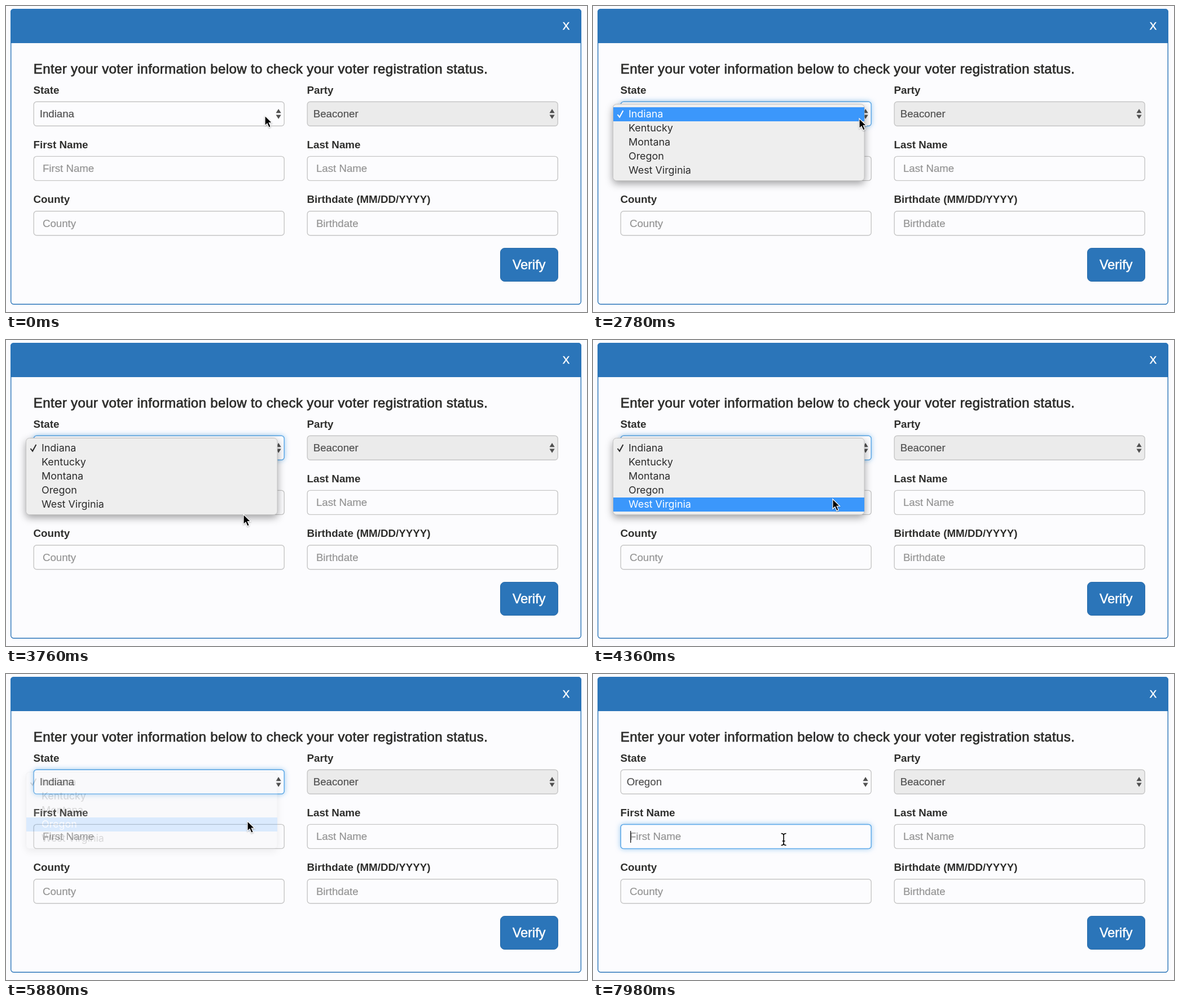
An HTML page that plays this animation: 1030x544 px, repeating every 8000 ms.

```html
<!DOCTYPE html>
<html lang="en">
<head>
<meta charset="utf-8">
<title>Voter registration form</title>
<style>
  html, body { margin: 0; width: 100%; height: 100%; overflow: hidden; background: #fcfcfe; }
  svg { display: block; width: 1030px; height: 544px; font: 18.7px "Liberation Sans", Arial, sans-serif; }
  .heading { font-size: 24px; letter-spacing: .37px; fill: #2e2e2c; stroke: #2e2e2c; stroke-width: .75px; }
  .label { font-size: 18.8px; font-weight: bold; fill: #2e2e2c; }
  .value { fill: #505050; stroke: #505050; stroke-width: .2px; }
  .hint { fill: #949494; stroke: #949494; stroke-width: .2px; }
  .onBlue { fill: #fff; stroke: #fff; stroke-width: .5px; }
  .box { fill: #fcfcfe; stroke: #c6c6c6; stroke-width: 1.4px; }
  .disabled { fill: #ebebeb; }
  .focus { fill: #fcfcfe; stroke: #5fabea; stroke-width: 1.5px; filter: drop-shadow(0 0 5px rgba(102, 175, 233, .65)); }
  .blue { fill: #2b75b9; }
  .arrows { fill: #505050; }
  .panel { fill: #eee; stroke: #c2c2c2; stroke-width: 1px; filter: drop-shadow(0 5px 7px rgba(0, 0, 0, .36)); }
  .item { font: 17.9px Inter, "Liberation Sans", sans-serif; fill: #2b2b2b; }
  .pointer { fill: #000; stroke: #fff; stroke-width: 1.2px; filter: drop-shadow(0 1px 1px rgba(0, 0, 0, .3)); }
</style>
</head>
<body>
<svg viewBox="0 0 1030 544">
  <rect x="8.7" y="5.7" width="1010.6" height="524.6" rx="5" fill="#fcfcfe" stroke="#2b75b9" stroke-width="1.4"/>
  <path class="blue" d="M8 66V11q0-6 6-6H1014q6 0 6 6V66z"/>
  <text class="onBlue" x="986.7" y="42">X</text>
  <text class="heading" x="48.8" y="119.5">Enter your voter information below to check your voter registration status.</text>
  <g id="form"></g>
  <rect class="blue" x="876.5" y="430.5" width="102" height="59" rx="7.5" stroke="#2a6ba8"/>
  <text class="onBlue" x="898" y="468" font-size="23.4">Verify</text>
  <path id="caret" d="M66.7 279V300" stroke="#222" stroke-width="1.4"/>
  <g id="menu">
    <rect class="panel" x="35.5" y="174.5" width="445.5" height="136" rx="6"/>
    <rect id="highlight" x="36" width="445" height="25" fill="#3b97fb"/>
    <path id="check" d="M43.5 193l3.6 4.6L53.4 186" fill="none" stroke-width="2"/>
  </g>
  <circle id="ring" r="29.3" fill="#fcfcfe" fill-opacity=".5" stroke="#111" stroke-width="2"/>
  <path id="arrow" class="pointer" d="M0 0V17.6L4 13.9L7 20.9L10.3 19.6L7.3 12.7H12.7z"/>
  <g id="beam" fill="none">
    <path d="M-4.5 -10.5Q0 -10.5 0 -7V7Q0 10.5 -4.5 10.5M4.5 -10.5Q0 -10.5 0 -7V7Q0 10.5 4.5 10.5M-2.5 3H2.5" stroke="#fff" stroke-width="3.4"/>
    <path d="M-4.5 -10.5Q0 -10.5 0 -7V7Q0 10.5 -4.5 10.5M4.5 -10.5Q0 -10.5 0 -7V7Q0 10.5 4.5 10.5M-2.5 3H2.5" stroke="#000" stroke-width="1.6"/>
  </g>
</svg>
<script>
const LOOP = 8000;
const OPEN = 1520, PICK = 5120, REHIGHLIGHT = 5260, FADE = 5500, CLOSED = 5960, FOCUS_NAME = 7300;
const STATES = ["Indiana", "Kentucky", "Montana", "Oregon", "West Virginia"];
const POINTER = [ // time, x, y
  [0, 459, 195], [200, 459, 195], [1000, 472, 191], [1700, 472, 191], [2500, 472, 200],
  [2850, 472, 200], [3700, 421, 310], [3960, 421, 310], [4700, 428, 261.5],
  [6450, 428, 261.5], [7150, 338, 294], [LOOP, 338, 294]
];
const CLICKS = [[1360, 1600], [7260, 7460]];

const byId = id => document.getElementById(id);

function add(parent, tag, attrs, text = "") {
  const node = document.createElementNS("http://www.w3.org/2000/svg", tag);
  for (const key in attrs) node.setAttribute(key, attrs[key]);
  node.textContent = text;
  parent.append(node);
  return node;
}

function addField(x, y, label, text, kind = "hint", boxClass = "box") {
  const form = byId("form"), isSelect = kind === "value";
  const frame = { x: x + .7, y: y + .7, width: 444, height: 43, rx: 5 };
  add(form, "text", { class: "label", x, y: y - 13.7 }, label);
  add(form, "rect", { ...frame, class: boxClass });
  const focus = add(form, "rect", { ...frame, class: "focus", opacity: 0 });
  if (isSelect) {
    add(form, "path", { class: "arrows", d: `M${x + 430} ${y + 20.8}h9.2l-4.6-7.2zm0 3.3h9.2l-4.6 7.2z` });
  }
  const value = add(form, "text", { class: kind, x: x + (isSelect ? 11.2 : 16.4), y: y + 28.7 }, text);
  return { focus, value };
}

const state = addField(48.5, 169.5, "State", "Indiana", "value");
addField(533.5, 169.5, "Party", "Beaconer", "value", "box disabled");
const firstName = addField(48.5, 266.7, "First Name", "First Name");
addField(533.5, 266.7, "Last Name", "Last Name");
addField(48.5, 364, "County", "County");
addField(533.5, 364, "Birthdate (MM/DD/YYYY)", "Birthdate");

const items = STATES.map((name, i) =>
  add(byId("menu"), "text", { class: "item", x: 63, y: 198.3 + 25 * i }, name));

const clamp = v => Math.min(1, Math.max(0, v));
const ramp = (t, start, end) => clamp((t - start) / (end - start));
const show = (id, visible) => byId(id).setAttribute("visibility", visible ? "visible" : "hidden");
const moveTo = (id, x, y) => byId(id).setAttribute("transform", `translate(${x} ${y})`);

function pointerAt(t) {
  const i = POINTER.findIndex(point => point[0] > t);
  const [t0, x0, y0] = POINTER[i - 1], [t1, x1, y1] = POINTER[i];
  const p = ramp(t, t0, t1), eased = p * p * (3 - 2 * p);
  return [x0 + (x1 - x0) * eased, y0 + (y1 - y0) * eased];
}

function drawMenu(t, y) {
  const opacity = t < OPEN ? 0 : 1 - ramp(t, FADE, CLOSED);
  byId("menu").setAttribute("opacity", opacity);
  const row = Math.floor((y - 180) / 25);
  const blinkedOff = t >= PICK && t < REHIGHLIGHT;
  const active = row < STATES.length && !blinkedOff ? row : -1;
  byId("highlight").setAttribute("y", 180 + 25 * active);
  show("highlight", active >= 0);
  byId("check").setAttribute("stroke", active === 0 ? "#fff" : "#2b2b2b");
  items.forEach((item, i) => item.style.fill = i === active ? "#fff" : "");
}

function draw(t) {
  const [x, y] = pointerAt(t);
  const nameFocus = ramp(t, FOCUS_NAME, FOCUS_NAME + 200);
  state.focus.setAttribute("opacity", ramp(t, OPEN, OPEN + 200) * (1 - nameFocus));
  firstName.focus.setAttribute("opacity", nameFocus);
  state.value.textContent = t < CLOSED ? "Indiana" : "Oregon";
  show("caret", t >= FOCUS_NAME);
  drawMenu(t, y);

  const overInput = t > CLOSED && y > 267;
  show("arrow", !overInput);
  show("beam", overInput);
  show("ring", CLICKS.some(([start, end]) => t >= start && t < end));
  moveTo("arrow", x, y);
  moveTo("beam", x, y);
  moveTo("ring", x + 1, y + 2);
}

function tick() {
  draw(performance.now() % LOOP);
  requestAnimationFrame(tick);
}
tick();
</script>
</body>
</html>
```
